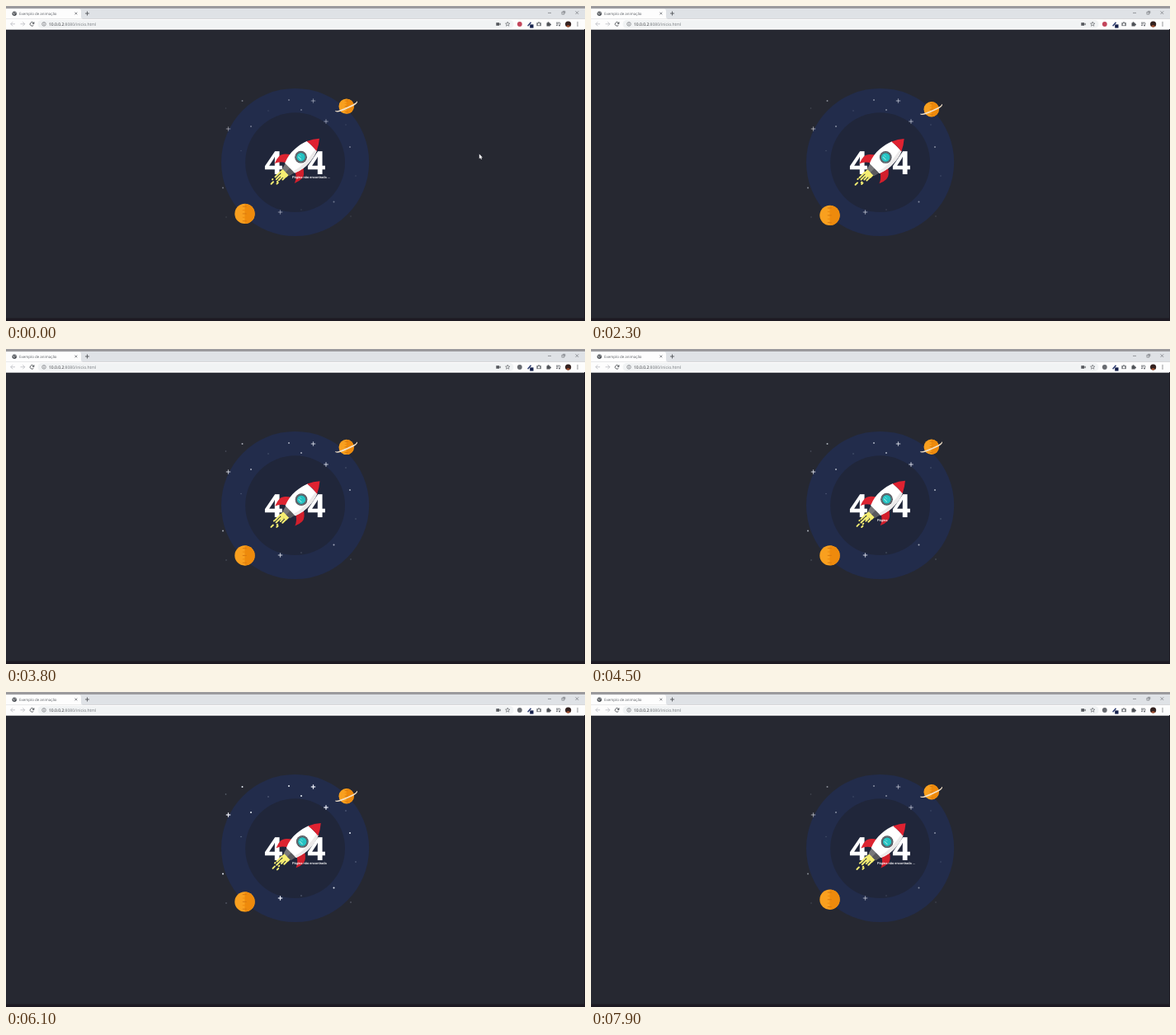
An HTML page with a canvas that plays this animation: 702 by 382 pixels, repeating every 8 s.

```html
<!DOCTYPE html>
<html lang="pt">
<head>
<meta charset="utf-8">
<title>Exemplo de animação</title>
<style>
  html, body { margin: 0; width: 100%; height: 100%; overflow: hidden; background: #262831; }
  canvas { display: block; width: 702px; height: 382px; }
</style>
</head>
<body>
<canvas id="stage"></canvas>
<script>
const W = 702, H = 382, LOOP = 8000;
const canvas = document.getElementById('stage');
const ctx = canvas.getContext('2d');
const ratio = window.devicePixelRatio || 1;
canvas.width = W * ratio;
canvas.height = H * ratio;

const MESSAGE = 'Página não encontrada ...';
const UI_FONT = '"Open Sans", "Noto Sans", sans-serif';
const PLUS_STARS = [[269.5, 149], [372.5, 115], [388, 140], [332.5, 250]];
const DOT_STARS = [[286.5, 115], [343, 114], [297, 146], [358, 126], [417, 171], [397.5, 237.5], [263, 220.5]];
const FAINT_STARS = [[266.5, 124], [318, 127], [412, 144], [285, 175.5], [424, 206], [358, 247], [418, 255], [267, 256]];
const GLOW = [[0, .4], [1100, 0], [2300, .5], [3800, .66], [5200, .72], [6100, 1], [7900, .5], [8000, .45]];

// ---------- helpers ----------
function rect(x, y, w, h, color) {
  ctx.fillStyle = color;
  ctx.fillRect(x, y, w, h);
}

function disc(x, y, r, color) {
  ctx.fillStyle = color;
  ctx.beginPath();
  ctx.arc(x, y, r, 0, Math.PI * 2);
  ctx.fill();
}

function ring(x, y, r, color, width) {
  ctx.strokeStyle = color;
  ctx.lineWidth = width;
  ctx.beginPath();
  ctx.arc(x, y, r, 0, Math.PI * 2);
  ctx.stroke();
}

function line(color, width, ...p) {
  ctx.strokeStyle = color;
  ctx.lineWidth = width;
  ctx.beginPath();
  for (let i = 0; i < p.length; i += 2) ctx.lineTo(p[i], p[i + 1]);
  ctx.stroke();
}

function shape(path, color) {
  ctx.fillStyle = color;
  ctx.fill(new Path2D(path));
}

function text(str, x, y, font, color, align = 'left') {
  ctx.font = font;
  ctx.fillStyle = color;
  ctx.textAlign = align;
  ctx.fillText(str, x, y);
}

// cubic-bezier(.25, .1, .25, 1)
function ease(p) {
  let lo = 0, hi = 1;
  for (let i = 0; i < 20; i++) {
    const s = (lo + hi) / 2, q = 1 - s;
    if (.75 * s * q * q + .75 * s * s * q + s * s * s < p) lo = s; else hi = s;
  }
  const s = lo, q = 1 - s;
  return .3 * s * q * q + 3 * s * s * q + s * s * s;
}

// 0 at the top of the bob, 1 at the bottom
function bob(t) {
  const half = 2500, n = (t + 580) / half, p = ease(n % 1);
  return Math.floor(n) % 2 ? 1 - p : p;
}

function mix(keys, t) {
  let i = 1;
  while (i < keys.length - 1 && keys[i][0] < t) i++;
  const [t0, a] = keys[i - 1], [t1, b] = keys[i];
  return a + (b - a) * (t - t0) / (t1 - t0);
}

// ---------- browser frame ----------
function browser(t) {
  rect(0, 0, W, 3, '#9b9a9d');
  rect(0, 3, W, 12.5, '#dfe2e6');
  shape('M0 15.5V3.5H88.5Q91 3.5 91 6V13Q91 15.5 93.5 15.5Z', '#fdfdfd');
  rect(0, 15.3, W, 13.2, '#fdfdfd');
  rect(0, 28, W, .6, '#d5d6d9');
  ctx.fillStyle = '#f1f3f4';
  ctx.beginPath();
  ctx.roundRect(38.5, 17, 577, 10, 5);
  ctx.fill();

  disc(10.2, 9.2, 2.7, '#4d5156');
  line('#fff', .7, 8.3, 8.2, 10, 9, 9.7, 10.8);
  line('#fff', .7, 10.8, 7.4, 12.2, 9);
  text('Exemplo de animação', 16, 10.9, '4.45px ' + UI_FONT, '#5d6166');
  line('#55585d', .7, 83.4, 7.6, 86.2, 10.4);
  line('#55585d', .7, 86.2, 7.6, 83.4, 10.4);
  line('#55585d', .9, 96, 9, 101, 9);
  line('#55585d', .9, 98.5, 6.5, 98.5, 11.5);

  const ink = '#62656a', dim = '#b9bcc0';
  line(ink, .6, 657, 8.4, 661, 8.4);
  ctx.lineWidth = .6;
  ctx.strokeRect(674, 7.2, 2.8, 2.8);
  line(ink, .6, 675, 6.3, 677.8, 6.3, 677.8, 9);
  line(ink, .6, 690.5, 6.3, 694.2, 10);
  line(ink, .6, 694.2, 6.3, 690.5, 10);

  line(dim, .8, 11, 21.8, 5.7, 21.8);
  line(dim, .8, 8.2, 19.3, 5.7, 21.8, 8.2, 24.3);
  line(dim, .8, 17.5, 21.8, 22.8, 21.8);
  line(dim, .8, 20.3, 19.3, 22.8, 21.8, 20.3, 24.3);
  ctx.strokeStyle = '#4b4e53';
  ctx.lineWidth = .9;
  ctx.beginPath();
  ctx.arc(31.5, 21.9, 2.3, .5, 5.5);
  ctx.stroke();
  shape('M34.3 19V21.8H31.5Z', '#4b4e53');
  ring(46, 21.9, 2.3, ink, .6);
  line(ink, .7, 46, 21.4, 46, 23.2);
  rect(45.65, 20.3, .7, .7, ink);

  const font = '5px ' + UI_FONT;
  text('10.0.0.2', 52, 23.7, font, '#27292d');
  const hostWidth = ctx.measureText('10.0.0.2').width;
  text(':8080/inicio.html', 52 + hostWidth, 23.7, font, '#71757a');

  // toolbar icons
  rect(594.3, 20.2, 3.8, 3.6, '#55585d');
  shape('M598 22L599.6 20.5V23.5Z', '#55585d');
  ctx.beginPath();
  for (let i = 0; i < 10; i++) {
    const r = i % 2 ? 1.2 : 2.8, a = i * Math.PI / 5 - Math.PI / 2;
    ctx.lineTo(608.2 + r * Math.cos(a), 22 + r * Math.sin(a));
  }
  ctx.closePath();
  ctx.strokeStyle = '#55585d';
  ctx.lineWidth = .6;
  ctx.stroke();

  const active = t < 2800 || (t >= 4600 && t < 5500);
  disc(622.8, 22, 2.9, active ? '#c3455b' : '#686b70');
  line('#2e3d70', 1.5, 632.6, 24.2, 636.5, 19.8);
  rect(635.2, 22.4, 4.3, 4.2, '#15204b');

  rect(643.3, 20.2, 5.6, 4, '#777a7e');
  rect(645, 19.4, 2.2, 1, '#777a7e');
  disc(646.1, 22.2, 1.2, '#fdfdfd');
  rect(655.5, 20.4, 4.2, 4.1, '#4e5156');
  disc(657.5, 20.2, 1, '#4e5156');
  disc(660, 22.4, 1, '#4e5156');
  line('#55585d', .8, 667, 20.2, 671.8, 20.2);
  line('#55585d', .8, 667, 21.9, 670, 21.9);
  line('#55585d', .8, 667, 23.6, 669, 23.6);
  disc(671, 23.6, .9, '#55585d');
  line('#55585d', .6, 671.6, 23.4, 671.6, 21.2, 672.7, 21.2);
  disc(681.6, 22, 3.6, '#33211f');
  shape('M679 24.6Q681.6 21.8 684.2 24.6Q681.6 26.8 679 24.6Z', '#a4502f');
  for (const y of [19.9, 21.9, 23.9]) disc(693, y, .6, '#4b4e53');
}

// ---------- scene ----------
function stars(t) {
  const glow = mix(GLOW, t);
  ctx.globalAlpha = glow;
  for (const [x, y] of PLUS_STARS) {
    line('#eef1fa', 1.2, x - 2.7, y, x + 2.7, y);
    line('#eef1fa', 1.2, x, y - 2.7, x, y + 2.7);
  }
  for (const [x, y] of DOT_STARS) disc(x, y, 1, '#e6ecf5');
  ctx.globalAlpha = glow * .42;
  for (const [x, y] of FAINT_STARS) disc(x, y, .8, '#c2cde0');
  ctx.globalAlpha = 1;
}

function ball(x, y, r) {
  disc(x, y, r, '#f9a01f');
  ctx.save();
  ctx.beginPath();
  ctx.arc(x, y, r, 0, Math.PI * 2);
  ctx.clip();
  rect(x, y - r, r, 2 * r, '#ee8a0c');
  for (let i = -2; i < 3; i++) {
    rect(x - r * .22, y + i * r * .36 - .5, r * .4, 1, i % 2 ? '#ee8a0c' : '#d97a10');
  }
  ctx.restore();
}

function planets(t) {
  const k = bob(t);
  ball(289.5, 250.3 + 4.4 * k, 12.2);

  const y = 118.6 + 8.2 * k;
  ball(412.7, y, 9.2);
  ctx.save();
  ctx.translate(412.7, y + .3);
  ctx.rotate(-.41);
  shape('M-14.6 -1Q-15.6 3 0 2.8Q15.6 3 14.6 -1Q13 .7 9 .8Q0 1.4 -9 .8Q-13 .7 -14.6 -1Z', '#f4e2c8');
  ctx.restore();
}

function digits() {
  const font = 'bold 39px "Open Sans", "Noto Sans", sans-serif';
  text('4', 324.4, 204, font, '#fff', 'center');
  text('4', 376.3, 204, font, '#fff', 'center');
}

function flame(t) {
  const lick = i => 1.1 * Math.sin(t / 130 + i * 2.1);
  const yellow = '#f6ee72';
  shape(`M-25 -5L${-31 + lick(0)} -5.4V-2.8H${-35 + lick(1)}V.2H${-32 + lick(2)}V3H${-30 + lick(3)}V5H-25Z`, yellow);
  ctx.lineCap = 'round';
  [[-4.9, -31, -39], [-2, -34, -41], [.8, -32, -37.5], [3.7, -29, -35]].forEach(([v, a, b], i) => {
    line(yellow, 2, a, v, b + lick(i), v);
  });
  [[-2.4, -45, -48.5], [2.4, -42.5, -44.5], [-5.2, -42.2, -42.8], [.8, -40.6, -41.5]].forEach(([v, a, b], i) => {
    line(yellow, 1.9, a + lick(i), v, b + lick(i), v);
  });
  ctx.lineCap = 'butt';
}

// drawn pointing along +x, then turned to the upper right
function rocket(t) {
  const lift = (1 - Math.cos((t - 1500) / 5200 * Math.PI)) / 2;
  ctx.save();
  ctx.translate(357.1 + 2.3 * lift, 183.6 - 2.2 * lift);
  ctx.rotate(-Math.PI / 4);
  flame(t);

  const fin = 'M-6 -9.5Q-12 -19.5 -18 -19.4Q-22 -19.5 -28 -17Q-22 -15 -17.5 -8Z';
  shape(fin, '#dc2430');
  ctx.save();
  ctx.scale(1, -1);
  shape(fin, '#d21f2c');
  ctx.restore();

  shape('M-18 -8L-26 -6V6L-18 8Z', '#777779');
  shape('M-18 0H-26V6L-18 8Z', '#59595d');
  shape('M-19 -8.5Q-8 -13 2 -12Q12 -11.3 19 -8.3V8.3Q12 11.3 2 12Q-8 13 -19 8.5Z', '#fff');
  shape('M-19 5.5Q-4 10.5 19 5.5V8.3Q12 11.3 2 12Q-8 13 -19 8.5Z', '#eceaea');
  shape('M18.5 -8.5Q26 -5 31.7 0Q26 5 18.5 8.5Q20 0 18.5 -8.5Z', '#df2231');
  disc(0, 0, 7.4, '#4c5058');
  ring(0, 0, 6.2, '#777b80', .8);
  disc(0, 0, 5.2, '#25c3c3');
  line('#8ce5e2', 1.2, -2, -2.8, -2, 2.4);
  line('#8ce5e2', .8, .6, -3.5, .6, -.4);
  ctx.restore();
}

function message(t) {
  let shown = MESSAGE, alpha = 1;
  if (t < 3900) alpha = Math.max(0, Math.min(1, (1900 - t) / 1200));
  else shown = MESSAGE.slice(0, Math.floor((t - 3900) / 100));
  ctx.globalAlpha = alpha;
  text(shown, 347, 209.1, '500 4.05px Roboto, sans-serif', '#fff');
  ctx.globalAlpha = 1;
}

function pointer(t) {
  if (t >= 500) return;
  shape('M573.8 179.4V185.2L575.1 184.1L576 186L577 185.5L576.1 183.7H577.8Z', '#fff');
}

function draw(t) {
  ctx.setTransform(ratio, 0, 0, ratio, 0, 0);
  ctx.textBaseline = 'alphabetic';
  ctx.textRendering = 'geometricPrecision';
  rect(0, 0, W, H, '#262831');
  browser(t);
  disc(350.6, 189.5, 89.6, '#222c4b');
  disc(350.6, 189.7, 60.4, '#20263a');
  stars(t);
  planets(t);
  digits();
  rocket(t);
  message(t);
  pointer(t);
  rect(0, 378.5, W, 3.5, '#1d1a22');
  rect(701, 28, 1, 354, '#1d1a22');
}

const start = performance.now();
function tick() {
  draw((performance.now() - start) % LOOP);
  requestAnimationFrame(tick);
}
tick();
</script>
</body>
</html>
```
